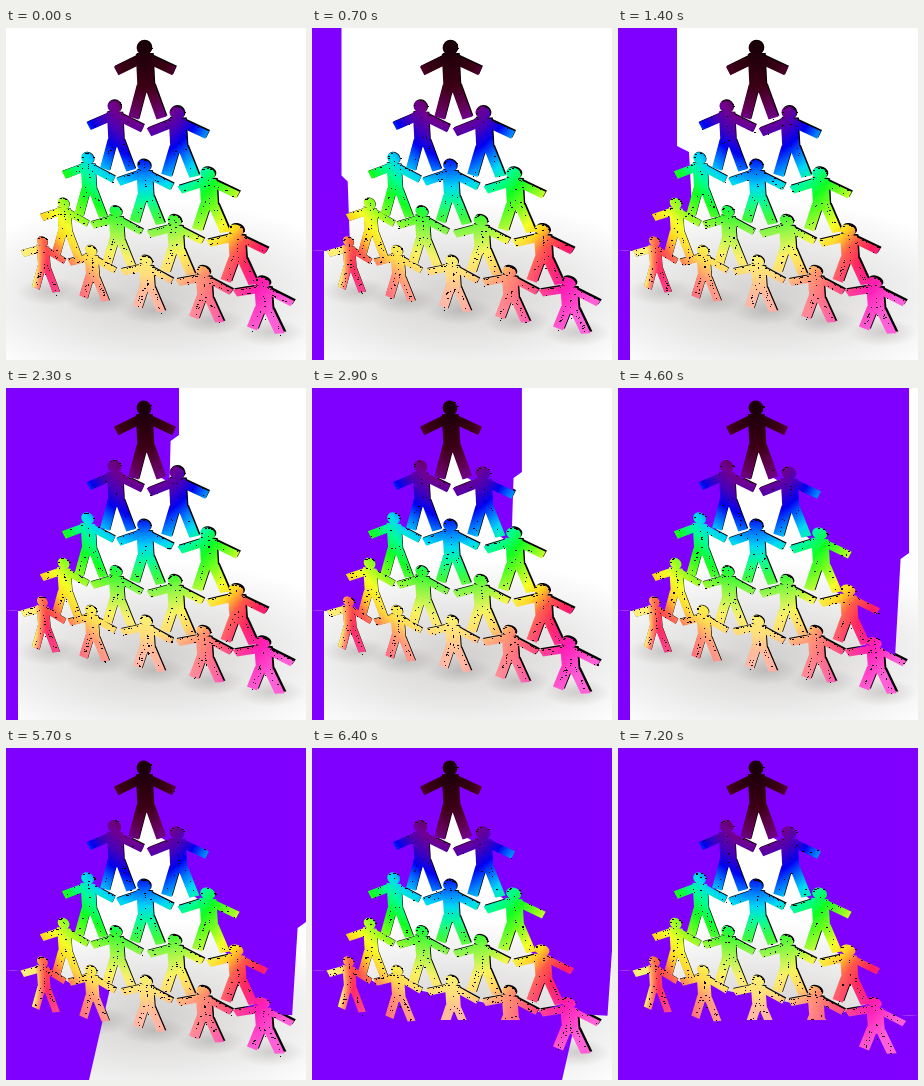
Write an HTML page with a canvas that moves like this. It is 300x332 px and loops after 7300 ms.

```html
<!DOCTYPE html>
<html lang="en">
<head>
<meta charset="utf-8">
<title>People pyramid</title>
<style>
  html, body { margin: 0; width: 300px; height: 332px; overflow: hidden; background: #fff; }
  canvas { display: block; }
</style>
</head>
<body>
<canvas id="stage" width="300" height="332"></canvas>
<script>
const W = 300, H = 332, LOOP = 7300, STEP = 100, ROWS = 5;
const PURPLE = '#8000ff';
const ctx = document.getElementById('stage').getContext('2d');

// One figure, measured from the centre of its head
const HAND = [29, 23], FOOT = [14, 70], CHEST = [0, 16];
const mirror = ([x, y]) => [-x, y];
const limbs = [
  { from: [-4, 11], to: mirror(HAND), width: 9.5 },
  { from: [4, 11], to: HAND, width: 9.5 },
  { from: [0, 6], to: [0, 45], width: 17 },
  { from: [-4, 38], to: mirror(FOOT), width: 10.5 },
  { from: [4, 38], to: FOOT, width: 10.5 }
];

const mix = (a, b, k) => a + (b - a) * k;

// The pyramid in perspective: each row is spread between its two sloping sides
function makeRow(n) {
  const left = [138 - 31 * n + 1.4 * n * n, 20 + 62 * n - 3.4 * n * n];
  const right = [138 + 34 * n - 1.1 * n * n, 20 + 67 * n - 2.1 * n * n];
  return Array.from({ length: n + 1 }, (_, i) => {
    const k = n ? (i / n) ** 1.09 : 0;
    const x = mix(left[0], right[0], k), y = mix(left[1], right[1], k);
    const wide = (30 - 1.1 * n + (x - 138) * 0.035) / 30;
    return { row: n, x, y, matrix: [wide, 0.045 * n * wide, 0.05, 1 / (1 + 0.11 * n), x, y] };
  });
}

const rows = Array.from({ length: ROWS }, (_, n) => makeRow(n));
const people = rows.flat();
const bottom = rows[ROWS - 1];

function at({ matrix: [a, b, c, d, e, f] }, [x, y]) {
  return [a * x + c * y + e, b * x + d * y + f];
}

function polygon(points) {
  const path = new Path2D();
  points.forEach(([x, y]) => path.lineTo(x, y));
  path.closePath();
  return path;
}

function paint(c, person, colour) {
  c.save();
  c.transform(...person.matrix);
  c.strokeStyle = c.fillStyle = colour;
  for (const { from, to, width } of limbs) {
    c.lineWidth = width;
    c.beginPath();
    c.moveTo(...from);
    c.lineTo(...to);
    c.stroke();
  }
  c.beginPath();
  c.arc(0, 0, 7.4, 0, Math.PI * 2);
  c.fill();
  c.restore();
}

function layer(draw) {
  const canvas = document.createElement('canvas');
  canvas.width = W;
  canvas.height = H;
  draw(canvas.getContext('2d'));
  return canvas;
}

// Elliptical gradient over the whole layer; stops are [position, colour]
function glow(c, x, y, rx, ry, stops) {
  c.save();
  c.translate(x, y);
  c.scale(rx, ry);
  const g = c.createRadialGradient(0, 0, 0, 0, 0, 1);
  stops.forEach(([pos, colour]) => g.addColorStop(pos, colour));
  c.fillStyle = g;
  c.fillRect(-9, -9, 18, 18);
  c.restore();
}

const shade = alpha => [[0, `rgba(80,74,70,${alpha})`], [0.5, `rgba(80,74,70,${alpha / 2})`], [1, 'rgba(80,74,70,0)']];

const floor = layer(c => {
  c.fillStyle = '#fff';
  c.fillRect(0, 0, W, H);
  glow(c, 150, 268, 215, 95, shade(0.26));
  bottom.forEach(p => glow(c, p.x + 8, p.y + 50, 34, 14, shade(0.2)));
  people.forEach(p => {
    c.save();
    c.translate(p.x / 150, -p.x / 150);
    paint(c, p, '#000');
    c.restore();
  });
});

// All figures share one rainbow that spreads from the top
const crowd = layer(c => {
  people.forEach(p => paint(c, p, '#000'));
  c.globalCompositeOperation = 'source-atop';
  glow(c, 138, 20, 220, 330, [
    [0, '#180008'], [0.12, '#3c0014'], [0.18, '#600050'], [0.23, '#700090'], [0.28, '#4800b8'],
    [0.33, '#0000f0'], [0.37, '#0068ff'], [0.42, '#00d8f4'], [0.47, '#00ff90'], [0.52, '#10ff20'],
    [0.59, '#90ff20'], [0.64, '#f4ff28'], [0.69, '#ffd420'], [0.74, '#ff5848'], [0.8, '#ff2060'],
    [0.9, '#ff20b8'], [1, '#ff60d8']
  ]);
  glow(c, 140, 280, 112, 112, [[0, 'rgba(255,228,195,.8)'], [0.5, 'rgba(255,225,170,.5)'], [1, 'rgba(255,225,170,0)']]);
  glow(c, 15, 235, 26, 60, [[0, '#fff080'], [0.6, '#ffec70'], [1, 'rgba(255,190,60,0)']]);
});

// The gaps inside the pyramid stay unpainted
const inner = polygon([
  ...rows.slice(0, -1).flatMap(r => [at(r[r.length - 1], CHEST), at(r[r.length - 1], FOOT)]),
  ...bottom.slice(1, -1).reverse().flatMap(p => [at(p, HAND), at(p, CHEST), at(p, mirror(HAND))]),
  ...rows.slice(0, -1).reverse().flatMap(r => [at(r[0], mirror(FOOT)), at(r[0], CHEST)])
]);
const outside = new Path2D();
outside.rect(0, 0, W, H);
outside.addPath(inner);

// The bottom row divides the upper sweep from the lower one
const seam = [[0, 222], ...bottom.map(p => at(p, CHEST)), [W, 268]];
const upper = polygon([...seam, [W, 0], [0, 0]]);
const lower = polygon([...seam, [W, H], [0, H]]);

const upperKeys = [[0, 0], [1400, 59], [2300, 173], [3600, 253], [4600, 291], [5700, 300], [7200, 320]];
const lowerKeys = [[0, 0], [400, 12], [4900, 12], [5700, 103], [6400, 270], [7200, 322]];

function keyed(keys, t) {
  const i = Math.max(1, keys.findIndex(k => t <= k[0]));
  const [t0, a] = keys[i - 1], [t1, b] = keys[i];
  return mix(a, b, (t - t0) / (t1 - t0));
}

function sweep(zone, points) {
  ctx.save();
  ctx.clip(outside, 'evenodd');
  ctx.clip(zone);
  ctx.fillStyle = PURPLE;
  ctx.fill(polygon(points));
  ctx.restore();
}

function drawPurple(x, edge) {
  // the upper front bends where it meets the side of the pyramid
  const before = x < 138;
  const knee = before ? 177 - x : x - 126;
  const low = before ? Math.min(x + 20, x * 1.35) : x - 14;
  sweep(upper, [[0, 0], [x, 0], [x, knee], [mix(low, x, 0.4), knee + 6], [low, 270], [0, 270]]);
  const foot = Math.max(Math.min(edge, 12), edge - 20);
  sweep(lower, [[0, 200], [edge, 200], [edge, 245], [foot, H], [0, H]]);
}

function random(seed) {
  return () => {
    seed = (seed + 0x6D2B79F5) | 0;
    let r = Math.imul(seed ^ seed >>> 15, 1 | seed);
    r ^= r + Math.imul(r ^ r >>> 7, 61 | r);
    return ((r ^ r >>> 14) >>> 0) / 4294967296;
  };
}

function drawSpeckles(frame) {
  const rnd = random(frame * 977 + 5);
  ctx.fillStyle = '#100408';
  for (const p of people) {
    for (let i = 0; i < 4 + 9 * p.row; i++) {
      const { from, to, width } = limbs[Math.floor(rnd() * limbs.length)];
      const k = rnd(), side = (rnd() < 0.6 ? -1 : rnd()) * width / 2;
      const [x, y] = at(p, [mix(from[0], to[0], k), mix(from[1], to[1], k) + side]);
      ctx.fillRect(Math.round(x), Math.round(y), rnd() < 0.25 ? 2 : 1, 1);
    }
    for (let i = 0; i < 5; i++) {
      const a = -Math.PI * rnd();
      const [x, y] = at(p, [Math.cos(a) * 7, Math.sin(a) * 7]);
      ctx.fillRect(Math.round(x), Math.round(y), 2, 1);
    }
  }
}

function draw(frame) {
  const t = frame * STEP, edge = keyed(lowerKeys, t);
  ctx.drawImage(floor, 0, 0);
  drawPurple(keyed(upperKeys, t), edge);
  ctx.drawImage(crowd, 0, 0);
  drawSpeckles(frame);
  // the lower sweep also swallows the feet in the middle
  ctx.fillStyle = PURPLE;
  ctx.fillRect(120, 272, Math.max(0, Math.min(100, edge - 134)), 32);
}

let last = -1;
function tick() {
  const frame = Math.floor(performance.now() % LOOP / STEP);
  if (frame !== last) draw(last = frame);
  requestAnimationFrame(tick);
}
tick();
</script>
</body>
</html>
```
